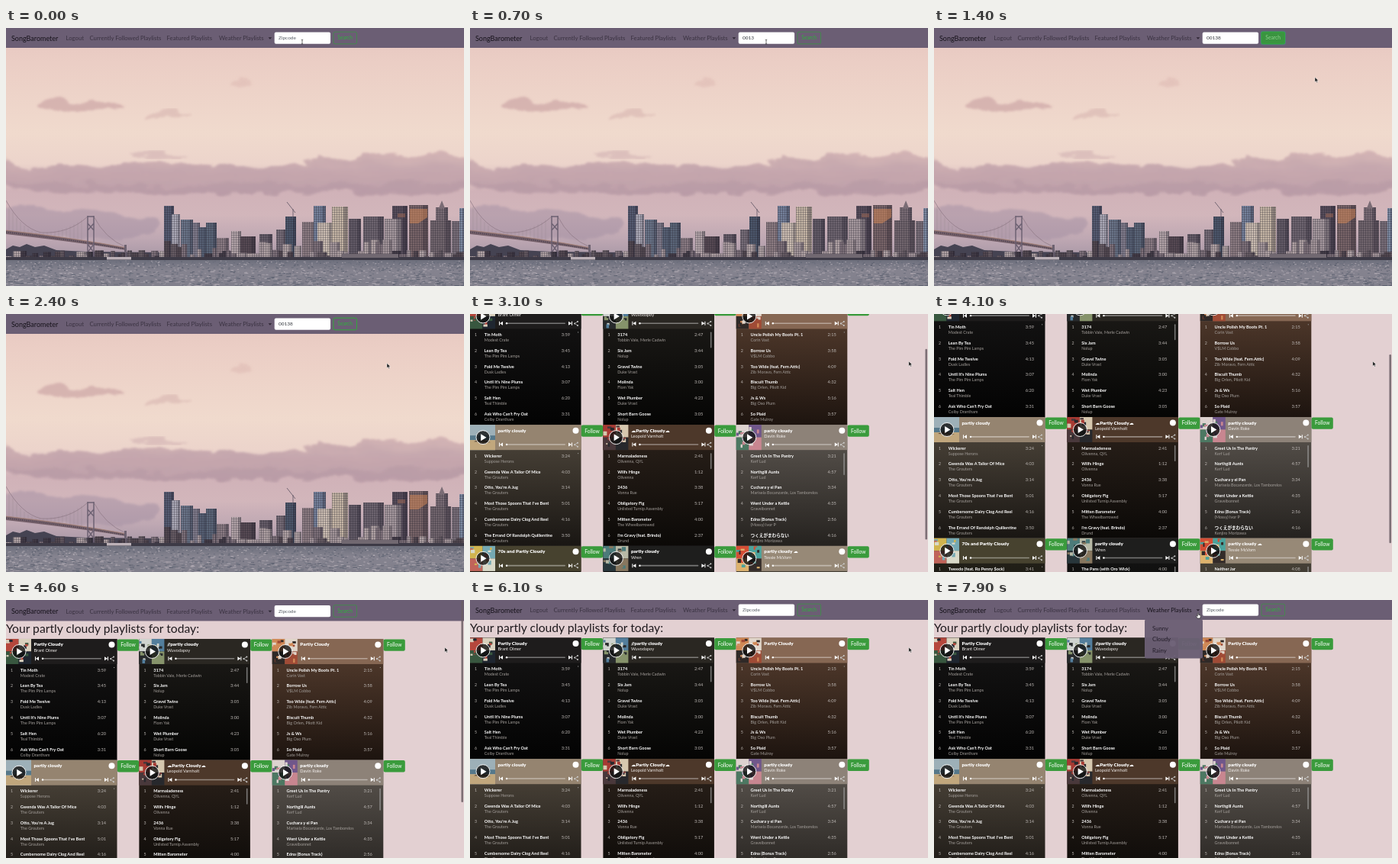
These frames come from a looping animation (600x338 px, 8 s). An HTML page:

```html
<!DOCTYPE html>
<html lang="en">
<head>
<meta charset="utf-8">
<title>Playlists by weather</title>
<style>
  html, body { margin: 0; width: 100%; height: 100%; overflow: hidden; background: #e3d0d2; }
  svg { display: block; width: 100vw; height: 100vh; font-family: Lato, "DejaVu Sans", "Noto Sans CJK JP", sans-serif; }
</style>
</head>
<body>
<svg id="stage" viewBox="0 0 600 338" preserveAspectRatio="none"></svg>
<script>
const LOOP = 8000, LOAD = 2750;
const ZIP = "00138";

const seeded = seed => () => (seed = (seed * 16807) % 2147483647) / 2147483647;
const esc = s => s.replace(/&/g, "&amp;");
const rect = (x, y, w, h, fill, extra = "") =>
  `<rect x="${x}" y="${y}" width="${w}" height="${h}" fill="${fill}" ${extra}/>`;
const path = (d, extra) => `<path d="${d}" ${extra}/>`;
const text = (x, y, size, fill, s, extra = "") =>
  `<text x="${x}" y="${y}" font-size="${size}" fill="${fill}" ${extra}>${esc(s)}</text>`;
const gradient = (id, ...stops) =>
  `<linearGradient id="${id}" x2="0" y2="1">${stops.map(([o, c]) => `<stop offset="${o}" stop-color="${c}"/>`).join("")}</linearGradient>`;

// ---------- City view ----------
const towers = [
  [207, 13, 233, "#545a70"], [217, 11, 244, "#aaa8b6"], [229, 16, 251, "#6a7488"], [245, 9, 255, "#807c8c"],
  [252, 12, 261, "#566074"], [262, 14, 255, "#5a6578"], [276, 16, 275, "#8a7b83"], [295, 13, 266, "#b3a4a8"],
  [307, 20, 273, "#564953"], [332, 17, 270, "#655c68"], [354, 13, 264, "#766c77"], [366, 14, 247, "#4b566a"],
  [388, 19, 254, "#8c7c82"], [403, 16, 233, "#74809a"], [408, 21, 255, "#cbbdb2"], [427, 21, 234, "#c5b5a5"],
  [449, 16, 250, "#625a66"], [468, 27, 247, "#6d646f"], [506, 20, 233, "#564c5a"], [496, 22, 250, "#a5989e"],
  [528, 25, 232, "#786468"], [563, 16, 235, "#7a6c75"], [556, 27, 252, "#71656d"], [584, 16, 253, "#786e78"],
  [594, 6, 236, "#7c8aa2"]
];

function buildings() {
  const rnd = seeded(41);
  const block = (x, y, w, fill) =>
    rect(x, y, w, 302 - y, fill) + rect(x, y, w, 302 - y, "url(#windows)") +
    rect(x + w * .72, y, w * .28, 302 - y, "#1f1c2a", 'opacity=".28"');
  let out = "";
  for (const [x, w, y, fill] of towers) out += block(x, y, w, fill);
  out += path("M529 237H552V248L540 256H529Z", 'fill="#d98a55" opacity=".5"') + rect(513, 243, 10, 5, "#b9765a", 'opacity=".4"');
  out += path("M567 236L571 226L575 236Z", 'fill="#7a6c75"');
  out += path("M376 250V237M368 228L379 242", 'stroke="#5d5563" stroke-width=".8"');
  const tones = ["#7d7079", "#51474f", "#a3959a", "#665b63", "#413a45", "#b0a2a4"];
  for (let x = 0; x < 600; x += 4 + rnd() * 7) {
    const downtown = x > 200 && x < 515;
    const h = 3 + rnd() * (downtown ? 22 : 8);
    out += block(x, 302 - h, 5 + rnd() * 8, tones[Math.floor(rnd() * 6)]);
  }
  return out;
}

function water() {
  const rnd = seeded(97);
  const strokes = { "#c3bcc2": "", "#4f5565": "", "#a5a0a9": "", "#646978": "" };
  const keys = Object.keys(strokes);
  for (let i = 0; i < 1500; i++) {
    const depth = rnd();
    strokes[keys[i % 4]] += `M${(rnd() * 604 - 4).toFixed(1)} ${(305 + depth * 33).toFixed(1)}h${(1.5 + depth * 6 * rnd()).toFixed(1)}`;
  }
  return rect(0, 304, 600, 34, "url(#water)") +
    keys.map(c => path(strokes[c], `stroke="${c}" stroke-width=".9" opacity=".75"`)).join("");
}

function bridge() {
  let hangers = "";
  for (let x = 4; x < 104; x += 5) {
    const u = (x - 45) / 61;
    hangers += `M${x} ${(268 - 21 * (u > 0 ? 1 : 3.6) * u * u).toFixed(1)}V${(265 + x * .15).toFixed(1)}`;
  }
  return path(hangers, 'stroke="#94808d" stroke-width=".3"') +
    path("M0 226Q20 262 46 268Q82 270 107 247M115 247Q130 276 157 287", 'fill="none" stroke="#8d7884" stroke-width=".7"') +
    path("M0 265Q90 275 158 288V291Q90 280 0 270Z", 'fill="#75606a"') +
    path("M0 265Q90 275 158 288", 'fill="none" stroke="#a98375" stroke-width=".8"') +
    path("M0 267.5Q90 277.5 158 290", 'fill="none" stroke="#4f4450" stroke-width="2" stroke-dasharray="1 1.6"') +
    path("M107 303V246M115 303V246M107 247H115M107 256L115 265M115 256L107 265M107 283L115 294M115 283L107 294", 'fill="none" stroke="#6e6273" stroke-width="1.5"') +
    rect(155, 284, 3, 17, "#6d6270") + rect(104, 299, 14, 5, "#514b5a");
}

function city() {
  const cloud = (d, fill, o) => path(d, `fill="${fill}" opacity="${o}" filter="url(#fluffy)"`);
  return rect(0, 0, 600, 306, "url(#sky)") +
    cloud("M42 102Q52 86 72 90Q86 104 104 100Q130 92 152 100Q140 109 108 110Q70 114 42 102Z", "#cfa9a8", .75) +
    cloud("M182 117Q205 105 238 111Q232 121 182 121Z", "#d5b2ae", .55) +
    cloud("M288 72Q305 58 326 69Q318 78 288 76Z", "#dcb7b1", .5) +
    cloud("M168 166Q205 159 244 165Q215 171 168 168Z", "#cfaeb0", .55) +
    cloud("M-9 173Q20 176 50 183Q100 178 150 181Q190 168 235 176Q265 178 300 185Q335 188 365 180Q410 170 450 175Q500 162 550 164Q580 160 610 166V213Q500 222 400 214Q250 220 120 212Q50 214 -9 209Z", "url(#bank)", .92) +
    cloud("M-9 206Q90 199 190 206Q300 199 400 206Q500 199 610 203V213Q300 220 -9 212Z", "#af929f", .3) +
    cloud("M-9 236Q100 234 190 250Q210 260 190 272Q100 282 -9 272Z", "#a38fa3", .5) +
    path("M0 290L9 285L18 287L27 283L38 287L50 285L66 291L105 293L205 294V304H0Z", 'fill="#454352"') +
    bridge() + buildings() +
    rect(0, 300, 600, 5, "#3d3a46") + rect(132, 300, 32, 3.5, "#bcb1b7") + rect(440, 296, 74, 5, "#716871") + water();
}

// ---------- Playlist cards ----------
// Each track reads title|artist|length.
const cards = [
  { name: "Partly Cloudy", owner: "Brant Olmer", tones: ["#1e1c1c", "#161515", "#030303"], art: ["#b5473c", "#d9d0bd", "#38573f", "#1f2630"], tracks: [
    "Tin Moth|Modest Crate|3:59", "Lean By Tea|The Pim Pim Lamps|3:45", "Fold Me Twelve|Dusk Ladles|4:13",
    "Until It's Nine Plums|The Pim Pim Lamps|3:07", "Salt Hen|Teal Thimble|6:20", "Ask Who Can't Fry Oat|Colby Drantham|3:31"] },
  { name: "//partly cloudy", owner: "Wuvodapoy", tones: ["#2a2722", "#1e1c19", "#050504"], art: ["#cfd3cf", "#537e9c", "#272a2c", "#86936b"], bar: 1, tracks: [
    "3174|Tobbin Vale, Merle Cadwin|2:47", "Six Jam|Nolup|3:44", "Gravel Twine|Duke Vrast|3:05",
    "Molinda|Flom Yak|3:00", "Wet Plumber|Duke Vrast|4:23", "Short Barn Goose|Nolup|3:05"] },
  { name: "Partly Cloudy", owner: "", tones: ["#866753", "#583f30", "#1d140f"], art: ["#d08956", "#e1d6ca", "#2f2927", "#a04b36"], tracks: [
    "Uncle Polish My Boots Pt. 1|Corin Vast|2:15", "Borrow Us|V$LM Cobbo|3:58", "Too Wide (feat. Fern Attic)|Zib Moravo, Fern Attic|4:09",
    "Biscuit Thumb|Big Orlen, Pilott Kid|4:32", "Js & Ws|Big Oxo Plum|5:16", "So Plaid|Gate Mulroy|3:57"] },
  { name: "partly cloudy", owner: "", tones: ["#958470", "#50483d", "#191613"], art: null, tracks: [
    "Wickerer|Suppose Herons|3:24", "Gwenda Was A Tailor Of Mice|The Grouters|4:03", "Otto, You're A Jug|The Grouters|3:14",
    "Most Those Spoons That I've Bent|The Grouters|5:01", "Cumbersome Dairy Clog And Reel|The Grouters|4:16", "The Errand Of Randolph Quillentine|The Grouters|3:50"] },
  { name: "☁Partly Cloudy☁", owner: "Leopold Varnholt", tones: ["#4d382a", "#2c221b", "#0b0907"], art: ["#a73a33", "#d6c8af", "#49383b", "#27282c"], bar: 1, tracks: [
    "Marmaladeness|Olivenna, QYL|2:41", "Wilfs Hinge|Olivenna|1:12", "2436|Vonna Rue|3:38",
    "Obligatory Fig|Unlisted Turnip Assembly|5:17", "Mitten Barometer|The Wheelbarrowed|4:00", "I'm Gravy (feat. Brindo)|Drund|2:37"] },
  { name: "partly cloudy", owner: "Davin Roke", tones: ["#8d8278", "#5d5751", "#25221f"], art: ["#ddd2cf", "#70578b", "#4c7862", "#c88690"], bar: 2, tracks: [
    "Greet Us In The Pantry|Kerf Lud|3:21", "Northgill Aunts|Kerf Lud|4:57", "Cuchara y el Pan|Marisela Bocanzarde, Los Tamborelos|3:34",
    "Went Under a Kettle|Gravelbonnet|4:35", "Edna (Bonus Track)|(Mossy) Ivor P|2:56", "つくえがまわらない|Kenjiro Morizawa|4:16"] },
  { name: "70s and Partly Cloudy", owner: "", tones: ["#47422f", "#28251c", "#090806"], art: ["#d1b44e", "#75a9b3", "#c0645a", "#d9d9c9"], tracks: [
    "Tweedo (feat. Ro Penny $ock)|Gate Mulroy|3:41", "Wiser Lamp|Gate Mulroy|3:51", "Syrup Ladder|Gate Mulroy|3:47",
    "Knit For Moss (feat. Wanda Brill)|Gate Mulroy|3:26"] },
  { name: "partly cloudy", owner: "Wren", tones: ["#1e1e1d", "#151514", "#040404"], art: ["#4c7b7a", "#b7b9a6", "#28363b", "#87775f"], bar: 1, tracks: [
    "The Pans (with Oro Wick)|Bardun, Oro Wick|4:00", "The Teaspoon - Damp Oar Remix|QYL, Martin Gorves|2:51", "Radish & Greys|The Knee and the Hearth|4:00",
    "Mulch|Ned Orpen, Tabul|4:01"] },
  { name: "partly cloudy ☁", owner: "Tessie McVorn", tones: ["#978977", "#4e483d", "#24211c"], art: ["#d44e35", "#4ba39c", "#ddb26d", "#332b29"], bar: 1, tracks: [
    "Neither Jar|Clive Grapperton|4:08", "Wax Cow|Lorinda Hampert|4:19", "Flan|Al Thorgan|3:58", "Yam|Al Thorgan|4:04"] }
];

function cover(colors, seed) {
  if (!colors) return rect(0, 0, 33, 33, "#9db0b8") + rect(0, 14, 33, 6, "#55788a") + rect(0, 20, 33, 13, "#c1a77d") + path("M5 22L14 18L27 23Z", 'fill="#5a4939"');
  const rnd = seeded(seed * 313 + 7);
  let out = "";
  for (let i = 0; i < 4; i++) {
    const x = (i % 2) * 16.5, y = (i >> 1) * 16.5;
    out += rect(x, y, 16.5, 16.5, colors[i]);
    for (let k = 1; k < 5; k++)
      out += rect(x + rnd() * 11, y + rnd() * 11, 2 + rnd() * 3.5, 2 + rnd() * 3.5, colors[(i + k) % 4]);
  }
  return out;
}

function card(c, i) {
  const x = (i % 3) * 174.4, y = 49.5 + Math.floor(i / 3) * 158.7;
  const [head, top, bottom] = c.tones;
  let out = gradient("list" + i, [0, top], [1, bottom]) +
    rect(0, 0, 145.5, 158.8, `url(#list${i})`) + rect(0, 0, 145.5, 33, head) + cover(c.art, i + 1) +
    `<circle cx="17" cy="16.5" r="9" fill="#111" fill-opacity=".8" stroke="#fff" stroke-width=".9"/>` +
    path("M14.2 12V21L21.5 16.5Z", 'fill="#fff"') +
    text(36.5, 9.5, 6.3, "#fff", c.name, 'font-weight="900"') + text(36.5, 16.8, 5.7, "#f2eeec", c.owner) +
    `<circle cx="138.5" cy="7.5" r="4" fill="#fff"/>` +
    path("M38 23.3h1v5h-1zM43 23.3v5l-4-2.5zM129 23.3v5l4-2.5zM133 23.3h1v5h-1z", 'fill="#fff"') +
    rect(47, 25, 78, 1.6, "#fff", 'opacity=".4" rx=".8"') + `<circle cx="48" cy="25.8" r="1.2" fill="#fff"/>` +
    path("M141 23.5L137 26L141 28.5", 'fill="none" stroke="#ccc" stroke-width=".7"') +
    `<g fill="#ccc"><circle cx="141" cy="23.5" r="1"/><circle cx="137" cy="26" r="1"/><circle cx="141" cy="28.5" r="1"/></g>` +
    (c.bar ? rect(140.5, 37, 1.6, c.bar > 1 ? 29 : 21, "#aaa", 'opacity=".65" rx=".8"') : rect(141, 37, 1.2, 1, "#999"));
  c.tracks.forEach((track, n) => {
    const [title, artist, length] = track.split("|"), base = 42.6 + n * 20.8;
    out += text(6, base, 5.3, "#bbb6b2", String(n + 1)) + text(18.8, base, 5.6, "#fff", title, 'font-weight="700"') +
      text(18.8, base + 7, 5.4, "#a39e9a", artist) + text(131, base, 5.7, "#bdb8b5", length, 'text-anchor="end"');
  });
  out += rect(145.8, .4, 28.2, 15.3, "#3a9b3c", 'rx="2"') + text(160, 10.4, 6.7, "#fff", "Follow", 'text-anchor="middle"');
  return `<g transform="translate(${x} ${y})">${out}</g>`;
}

// ---------- Navigation ----------
function nav() {
  const link = (x, s, id) => text(x, 16.3, 7.75, "#3b3342", s, id ? `id="${id}"` : "");
  return rect(0, -6, 600, 32, "#6b5e74") +
    text(7, 16.6, 9, "#17131b", "SongBarometer") +
    link(78.5, "Logout") + link(109.5, "Currently Followed Playlists") + link(210.5, "Featured Playlists") +
    link(279, "Weather Playlists", "weather") + path("M343.6 12.2h4.6l-2.3 2.5z", 'fill="#2c2532"') +
    rect(351.7, 5.4, 73.4, 15.3, "#fff", 'rx="2"') + text(357, 15.4, 6.5, "#555b63", "", 'id="zip"') +
    rect(427.6, 3.7, 33.4, 18.6, "#3f8f86", 'id="halo" rx="3"') +
    rect(429, 5.2, 30.5, 15.6, "#3a9440", 'id="button" rx="2"') +
    text(444.2, 15.4, 6.7, "#2fb03c", "Search", 'id="label" text-anchor="middle"');
}

const menu = `<g id="menu">${rect(276, 25.5, 76, 51, "#6b5e74", 'rx="2" fill-opacity=".96"')}${
  ["Sunny", "Cloudy", "Rainy"].map((s, i) => text(286, 39.6 + i * 14.5, 7.75, "#241e2a", s)).join("")}</g>`;

const pointers = {
  beam: path("M-1.2 -3Q0 -3 0 -2Q0 -3 1.2 -3M0 -2V2M-1.2 3Q0 3 0 2Q0 3 1.2 3", 'fill="none" stroke="#333" stroke-width=".7"'),
  arrow: path("M0 0V6.2L1.5 4.9L2.5 7.1L3.6 6.6L2.6 4.5H4.5Z", 'fill="#111" stroke="#fff" stroke-width=".5"'),
  hand: path("M-.7 -3Q0 -3.9 .7 -3V-.6L2.9 0Q3.5 .4 3.3 1.6L2.7 4H-1L-2.7 1Q-2.4 .1 -1.5 .8L-.7 1.5Z", 'fill="#fff" stroke="#111" stroke-width=".6"')
};

const svg = document.getElementById("stage");
svg.innerHTML = `<defs>
  ${gradient("sky", [0, "#e6c6c0"], [.15, "#ebcec5"], [.45, "#f0dacd"], [.58, "#ecd4cb"], [.7, "#d0b2b8"], [.8, "#d2b6bb"], [.9, "#bfa8b3"], [1, "#a394a3"])}
  ${gradient("bank", [0, "#d2b2b3"], [.4, "#c4a5ac"], [1, "#bd9fa9"])}
  ${gradient("water", [0, "#6d6f7c"], [.4, "#85838f"], [1, "#807f8b"])}
  <pattern id="windows" width="3" height="3" patternUnits="userSpaceOnUse">${rect(0, 1, 3, 1, "#241f2c", 'opacity=".25"')}${rect(1, 0, 1, 3, "#241f2c", 'opacity=".28"')}</pattern>
  <filter id="fluffy" x="-10%" y="-30%" width="120%" height="160%">
    <feTurbulence type="fractalNoise" baseFrequency=".022 .05" numOctaves="4" seed="5" result="noise"/>
    <feDisplacementMap in="SourceGraphic" in2="noise" scale="24" xChannelSelector="R" yChannelSelector="G"/>
    <feGaussianBlur stdDeviation="1.8"/>
  </filter></defs>
  <g id="city">${city()}</g>
  <g id="page"><g id="results">${text(0, 42, 15.7, "#1f1a1e", "Your partly cloudy playlists for today:")}${cards.map(card).join("")}</g>${nav()}${menu}</g>
  ${rect(596.4, 0, 2.6, 264, "#6b5f66", 'id="bar" rx="1.3"')}
  <g id="cursor">${Object.entries(pointers).map(([k, p]) => `<g id="${k}">${p}</g>`).join("")}</g>`;

// ---------- Motion ----------
const el = id => document.getElementById(id);
const show = (id, on) => el(id).setAttribute("display", on ? "inline" : "none");
const ramp = (t, from, to) => Math.min(1, Math.max(0, (t - from) / (to - from)));
const ease = u => u * u * (3 - 2 * u);

function track(t, keys) {
  const next = keys.findIndex(k => k[0] > t);
  if (next < 0) return keys[keys.length - 1].slice(1);
  if (next === 0) return keys[0].slice(1);
  const a = keys[next - 1], b = keys[next], u = ease(ramp(t, a[0], b[0]));
  return a.slice(1).map((v, i) => v + (b[i + 1] - v) * u);
}

const cursorPath = [[850, 388, 18.2], [1080, 444, 15], [1150, 444, 15], [1380, 499, 64.5], [2500, 499, 64.5], [2950, 574.8, 62], [6700, 574.8, 62], [7300, 346, 20]];
const scrollPath = [[2900, 0], [3350, 150], [3750, 150], [4450, -3], [4750, 0]];

function update(t) {
  const loaded = t >= LOAD;
  const [scroll] = track(t, scrollPath);
  show("city", !loaded);
  show("results", loaded);
  el("page").setAttribute("transform", `translate(0 ${-scroll})`);

  const typed = loaded ? "" : ZIP.slice(0, Math.max(0, Math.floor((t - 120) / 130)));
  el("zip").textContent = typed || "Zipcode";
  el("zip").setAttribute("fill", typed ? "#30343a" : "#555b63");

  const fill = loaded ? 0 : ramp(t, 1040, 1190) - ramp(t, 1800, 1950);
  const focused = !loaded && t >= 1120;
  el("button").setAttribute("fill-opacity", fill);
  el("button").setAttribute("stroke", focused ? "#2cb035" : "#369a40");
  el("button").setAttribute("stroke-width", focused ? .9 : .7);
  el("label").setAttribute("fill", fill > .5 ? "#8ed08f" : "#2fb03c");
  el("halo").setAttribute("opacity", fill * .5);

  const down = Math.max(0, scroll);
  el("bar").setAttribute("y", 1 + down * .71);
  el("bar").setAttribute("height", 264 - down * .227);
  el("bar").setAttribute("opacity", .85 * ramp(t, 2880, 2960) * (1 - ramp(t, 5000, 5300)));

  const [x, y] = track(t, cursorPath);
  el("cursor").setAttribute("transform", `translate(${x} ${y})`);
  const shape = t < 960 ? "beam" : t >= 7230 || (t > 1040 && t < 1190) ? "hand" : "arrow";
  Object.keys(pointers).forEach(k => show(k, k === shape));
  el("weather").setAttribute("fill", t >= 7230 ? "#17131b" : "#3b3342");
  show("menu", t >= 7450);
}

const start = performance.now();
function frame() {
  update((performance.now() - start) % LOOP);
  requestAnimationFrame(frame);
}
frame();
</script>
</body>
</html>
```
